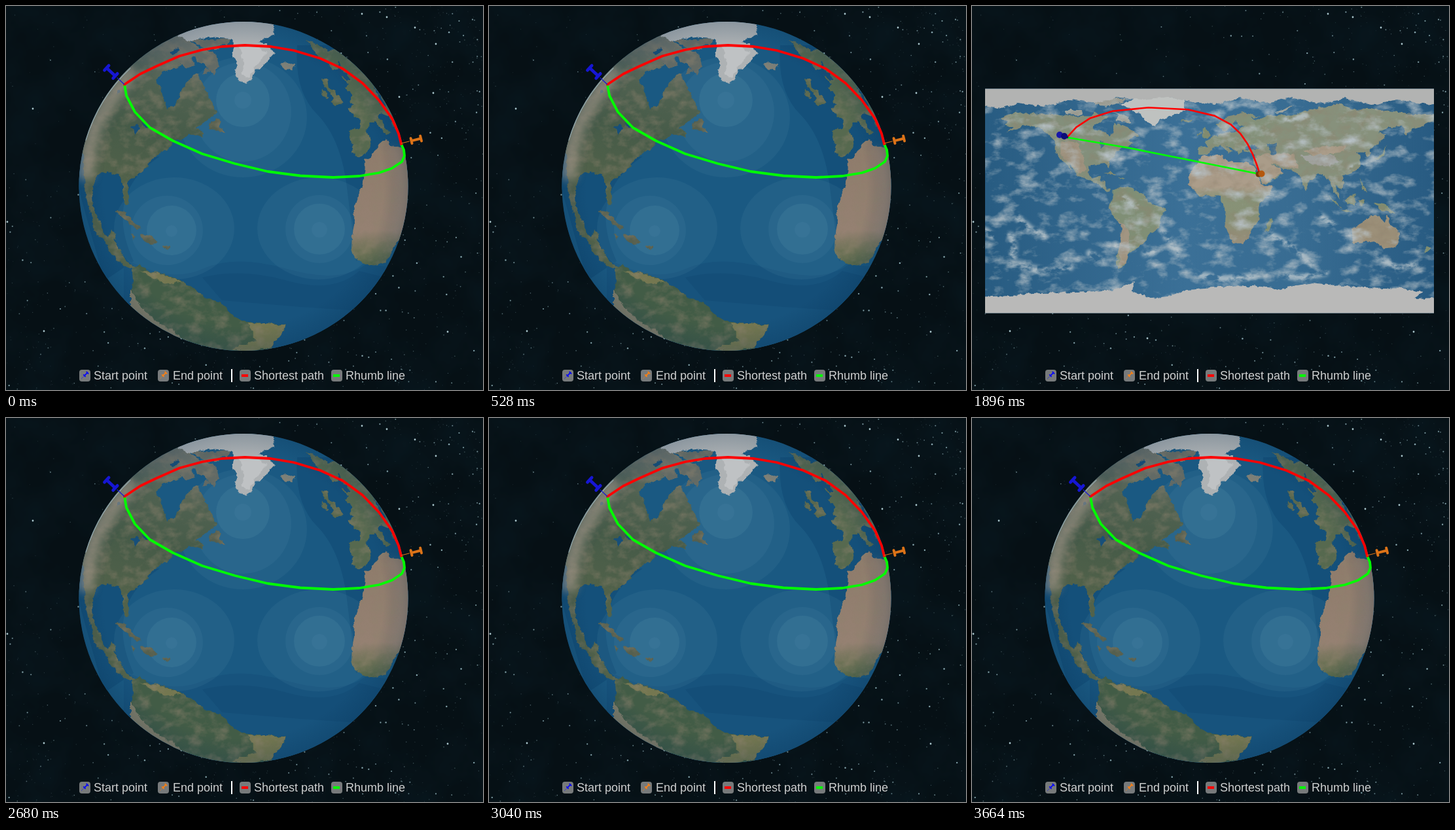
Animation of 729x587 px, one loop 4 s. Source, as an HTML page:

```html
<!DOCTYPE html>
<html lang="en">
<head>
<meta charset="utf-8">
<title>Shortest path and rhumb line</title>
<style>
html, body { margin: 0; height: 100%; overflow: hidden; background: #061015; }
svg { display: block; width: 729px; height: 587px; }
text { font: 18px "Liberation Sans", Arial, sans-serif; fill: #cfd0d0; }
.route { fill: none; stroke-linejoin: round; stroke-linecap: round; }
</style>
</head>
<body>
<svg viewBox="0 0 729 587">
<defs>
  <!-- ragged coasts -->
  <filter id="coast" filterUnits="userSpaceOnUse" x="0" y="0" width="729" height="587" color-interpolation-filters="sRGB">
    <feTurbulence type="fractalNoise" baseFrequency=".11" numOctaves="3" seed="4"/>
    <feColorMatrix values="1 0 0 0 0  0 1 0 0 0  0 0 1 0 0  0 0 0 0 1" result="n"/>
    <feDisplacementMap in="SourceGraphic" in2="n" scale="7" xChannelSelector="R" yChannelSelector="G"/>
  </filter>
  <!-- mottled ground -->
  <filter id="ground" filterUnits="userSpaceOnUse" x="0" y="0" width="729" height="587" color-interpolation-filters="sRGB">
    <feTurbulence type="fractalNoise" baseFrequency=".05 .07" numOctaves="4" seed="9"/>
    <feColorMatrix values="0 0 0 0 .56  0 0 0 0 .51  0 0 0 0 .43  1.2 0 0 0 -.5"/>
    <feComposite in2="SourceGraphic" operator="in" result="spots"/>
    <feMerge><feMergeNode in="SourceGraphic"/><feMergeNode in="spots"/></feMerge>
  </filter>
  <filter id="wisps" filterUnits="userSpaceOnUse" x="20" y="127" width="686" height="342" color-interpolation-filters="sRGB">
    <feTurbulence type="fractalNoise" baseFrequency=".03 .05" numOctaves="5" seed="12"/>
    <feColorMatrix values="0 0 0 0 .72  0 0 0 0 .76  0 0 0 0 .78  2.4 0 0 0 -1.2"/>
  </filter>
  <!-- broken cloud bands -->
  <filter id="streaks" filterUnits="userSpaceOnUse" x="0" y="100" width="729" height="387" color-interpolation-filters="sRGB">
    <feTurbulence type="fractalNoise" baseFrequency=".06 .09" numOctaves="5" seed="2"/>
    <feColorMatrix values="0 0 0 0 1  0 0 0 0 1  0 0 0 0 1  4 0 0 0 -1.5" result="gaps"/>
    <feGaussianBlur in="SourceGraphic" stdDeviation="2.5"/>
    <feComposite in2="gaps" operator="in"/>
  </filter>
  <filter id="haze" filterUnits="userSpaceOnUse" x="0" y="0" width="729" height="587" color-interpolation-filters="sRGB">
    <feTurbulence type="fractalNoise" baseFrequency=".012" numOctaves="4" seed="7"/>
    <feColorMatrix values="0 0 0 0 .04  0 0 0 0 .12  0 0 0 0 .16  .8 0 0 0 -.3"/>
  </filter>
  <filter id="soft" filterUnits="userSpaceOnUse" x="90" y="10" width="550" height="540"><feGaussianBlur stdDeviation="7"/></filter>
  <linearGradient id="north" gradientUnits="userSpaceOnUse" x1="200" y1="280" x2="260" y2="60">
    <stop stop-color="#52624a"/><stop offset=".4" stop-color="#465b48"/><stop offset=".7" stop-color="#4f6150"/><stop offset="1" stop-color="#69706a"/>
  </linearGradient>
  <linearGradient id="sahara" gradientUnits="userSpaceOnUse" x1="555" y1="210" x2="565" y2="400">
    <stop stop-color="#8e7b6b"/><stop offset=".7" stop-color="#958172"/><stop offset=".86" stop-color="#6d7256"/><stop offset="1" stop-color="#4e6346"/>
  </linearGradient>
  <linearGradient id="savanna" gradientUnits="userSpaceOnUse" x1="0" y1="37" x2="0" y2="-35">
    <stop stop-color="#aa9d8b"/><stop offset=".36" stop-color="#ac9d8a"/><stop offset=".48" stop-color="#879277"/><stop offset=".7" stop-color="#889176"/><stop offset="1" stop-color="#998f7b"/>
  </linearGradient>
  <linearGradient id="sea" x2="1">
    <stop stop-color="#285c82"/><stop offset=".45" stop-color="#3b7097"/><stop offset=".7" stop-color="#386c92"/><stop offset="1" stop-color="#285b82"/>
  </linearGradient>
  <radialGradient id="rim">
    <stop offset=".85" stop-color="#02294b" stop-opacity="0"/><stop offset="1" stop-color="#02294b" stop-opacity=".2"/>
  </radialGradient>
  <clipPath id="ball"><circle cx="363" cy="275.5" r="251.5"/></clipPath>
  <clipPath id="sheet"><path d="M20 126.500H706V469.500H20z"/></clipPath>
  <g id="pin">
    <path d="M0 0H13" stroke-width="1"/>
    <path d="M15 0H30" stroke-width="4"/>
    <path d="M16-4V4M31-4V4" stroke-width="4" stroke-linecap="round"/>
  </g>
  <rect id="tile" y="556" width="17" height="18" rx="4" fill="#777a7b"/>
</defs>

<rect width="729" height="587" fill="#061015"/>
<rect width="729" height="587" filter="url(#haze)"/>
<g id="stars" fill="none"></g>

<g id="globe">
  <g clip-path="url(#ball)">
    <path fill="#1a5982" d="M100 20H620V540H100z"/>
    <path fill="#14507a" d="M445 60Q440 130 475 165T520 270L535 390 630 350V60zM100 240L165 235 235 230Q190 260 181 300T195 390L150 420z"/>
    <path fill="#17537d" d="M180 385Q250 425 300 402T430 402 550 395L600 400V540H180z"/>
    <path fill="#144e78" d="M300 415Q360 400 430 420T540 405L600 420V470L450 460 330 450z"/>
    <g id="glow" fill="#6ea0bb"></g>
    <g filter="url(#ground)"><g filter="url(#coast)">
      <path fill="url(#north)" d="M118 215L119 250 122 290 129 318 134 342 141 349 153 363 161 377 171 390 185 399 197 403 204 397 193 399 181 386 173 372 166 360 168 347 160 343 156 352 148 348 145 330 133 308 132 290 135 267 141 256 155 254 172 258 178 265 178 281 181 302 186 305 188 290 186 273 190 265 205 256 217 247 220 236 235 225 249 218 256 206 270 203 282 195 300 201 301 192 290 188 306 176 322 164 317 152 310 138 302 120 291 104 279 113 265 134 259 151 246 157 241 142 236 123 229 111 240 101 264 92 276 83 302 70 288 58 255 35 150 40 90 180z"/>
      <path fill="#626a65" d="M286 68L305 64 321 74 326 93 317 106 306 91 292 85zM290 58L316 54 326 66 306 66zM264 84L279 76 289 90 274 96zM307 94L312 99 300 105zM282 52L342 50 338 60 300 62z"/>
      <path fill="#555f4e" d="M314 176L326 172 327 184 335 193 320 190 309 186zM166 312L180 315 196 330 206 338 200 341 185 330zM207 348L222 352 233 362 222 364 208 358zM239 367L250 369 246 373zM191 350L198 352 194 357z"/>
      <path fill="#425c46" d="M193 403L203 394 216 405 238 409 268 420 287 431 304 446 326 451 341 467 350 475 371 484 397 486 427 487 426 495 414 507 402 530 350 550 250 540 200 475 202 460 190 437 194 421z"/>
      <path fill="#747750" d="M370 485L397 486 427 488 425 496 406 520 370 530 345 524 382 512zM205 405L235 409 268 421 255 426 226 417z"/>
      <path fill="#85806a" d="M190 432L204 458 230 482 260 500 288 524 270 526 225 500 190 460z"/>
      <path fill="#56694f" d="M460 53L476 58 493 68 520 65 600 150 625 220 607 214 600 192 590 181 585 168 573 163 569 169 581 188 589 194 581 197 565 178 558 178 551 188 555 198 558 214 549 227 538 232 530 224 527 205 524 190 540 187 542 173 530 166 523 157 533 151 525 146 531 137 519 125 525 119 514 112 510 96 500 98 492 85 478 78z"/>
      <path fill="#59684e" d="M483 110L491 112 493 125 503 130 515 146 504 153 495 146 501 140 490 126zM483 126L490 131 491 140 482 138z"/>
      <path fill="#7a7f79" d="M418 89L425 85 434 87 442 90 438 97 427 98z"/>
      <path fill="url(#sahara)" d="M548 235L557 231 570 211 580 203 585 205 587 213 600 215 609 218 630 230 632 350 598 360 580 392 560 399 546 394 532 384 528 371 529 350 533 330 530 318 539 290 547 265z"/>
    </g></g>
    <g filter="url(#coast)">
      <path fill="#aeb2b4" d="M262 45L280 54 309 48 342 50 350 55 346 74 353 90 349 103 356 113 367 119 376 112 381 98 391 93 400 84 411 72 399 58 386 55 410 43 408 25 363 15 300 20z"/>
      <path fill="#bfc2c4" d="M356 62L383 60 399 72 384 88 372 110 360 104 364 86z"/>
      <path fill="#174f79" d="M192 186L200 180 205 187 198 197zM207 178L217 182 223 187 213 186zM169 134L172 128 177 132zM250 70L263 63 266 67 254 76zM508 83L514 98 526 110 520 113 508 103zM562 122L574 140 580 154 571 148z"/>
    </g>
    <path d="M121 265Q125 195 145 165T192 95" fill="none" stroke="#c4ad95" stroke-width="24" opacity=".62" filter="url(#soft)"/>
    <path d="M592 215Q620 280 593 355" fill="none" stroke="#c6af9e" stroke-width="8" opacity=".25" filter="url(#soft)"/>
    <circle cx="363" cy="275.5" r="251.500" fill="url(#rim)"/>
  </g>
  <path d="M122 205A251 251 0 0 1 190 95" class="route" stroke="#a9c7d5" stroke-width="1.200" opacity=".6"/>
  <g class="route" stroke-width="3.800">
    <path stroke="#0f0" d="M181 120L184 137 197 162 220 186 255 206 300 226 350 241 400 253 450 259.500 500 262 540 260 570 255 590 248 605 238 609 229 608 220 604 211"/>
    <path stroke="#f00" d="M181 120L205 104 230 92 265 76.500 300 67 330 62 365 60 405 62 440 68 480 80 515 96 545 118 570 144 590 172 600 195 604 211"/>
  </g>
  <use href="#pin" stroke="#1616d4" transform="translate(181 120) rotate(223) scale(1.200)"/>
  <use href="#pin" stroke="#dc7318" transform="translate(604 210) rotate(-14)"/>
</g>

<g id="map" clip-path="url(#sheet)">
  <path fill="url(#sea)" d="M20 126H706V470H20z"/>
  <g filter="url(#ground)"><g filter="url(#coast)">
    <!-- longitude and latitude in degrees -->
    <g transform="translate(363 298) scale(1.9056 -1.9056)">
      <path fill="#838f7b" d="M-168 66L-156 71-141 70-128 70-115 68-108 68-95 68-93 72-86 68-82 69-81 67-87 64-94 60-92 57-82 55-80 51-77 57-77 62-70 61-65 59-60 55-56 52-66 50-61 46-66 44-70 43-74 40-76 36-81 31-80 26-82 28-84 30-90 29-97 28-97 22-94 18-91 19-87 21-88 16-83 15-83 10-79 9-81 7-86 11-94 16-105 20-109 25-114 31-110 23-116 31-121 35-124 41-124 48-130 54-136 58-146 61-152 59-163 55-157 59-164 61-161 64z"/>
      <path fill="#a09480" d="M-120 47L-106 48-101 35-99 25-105 22-114 32-120 38z"/>
      <path fill="#808f76" d="M-78 8L-72 12-62 10-52 5-50 0-44-3-35-6-39-13-41-22-48-26-53-34-58-38-65-42-66-47-69-52-72-54-75-49-73-40-71-30-70-18-76-14-81-5-78 2z"/>
      <path fill="#a19582" d="M-76-13L-70-18-65-22-64-38-67-50-72-52-73-40-71-28-71-18z"/>
      <path fill="url(#savanna)" d="M-6 36L10 37 11 33 20 31 32 31 35 28 43 12 51 12 48 5 40-3 40-15 35-20 32-27 27-34 18-34 12-18 13-8 9 0 9 4-8 4-17 14-16 22z"/>
      <path fill="#84917a" d="M-9 43L-9 37-2 37 3 42 9 44 15 38 18 40 13 45 20 41 23 37 27 41 36 37 50 37 65 40 68 69 55 69 44 68 40 65 33 67 41 67 28 71 15 68 5 61 8 58 13 56 17 61 22 65 24 60 28 60 20 55 9 54 2 51-4 48-1 44z"/>
      <path fill="#87917c" d="M36 37L35 31 43 13 52 17 59 22 56 26 50 30 57 26 66 25 72 20 77 8 80 15 88 22 92 21 97 16 99 8 104 1 101 13 106 9 109 14 106 20 113 22 121 28 121 36 118 39 125 39 127 35 129 37 129 42 140 50 142 54 136 55 143 59 155 60 157 52 163 58 170 60 180 65 180 69 160 70 140 73 113 74 105 78 80 73 68 69 50 60z"/>
      <path fill="#aa9c89" d="M36 32L43 14 52 18 59 23 50 30 62 27 72 26 67 38 50 38 38 37zM75 40L90 44 110 44 105 39 85 36z"/>
      <path fill="#a0a29e" d="M73 36L80 30 95 28 103 31 100 37 85 37z"/>
      <path fill="#9c9079" d="M114-22L122-18 130-12 136-12 140-17 142-11 146-19 153-26 150-37 140-38 132-32 124-33 115-34z"/>
      <path fill="#7e8d70" d="M95 5L104-3 106-6 100-1zM109 1L117 6 116-4 110-3zM131-1L141-3 150-10 139-8zM105-7L115-8 109-9zM120 1L125 1 122-5 120-4zM121 18L126 8 123 9zM130 32L140 36 142 44 139 38zM44-25L49-13 50-16 47-25zM173-35L178-38 168-46 173-42zM-85 22L-75 20-79 23zM-73 19L-68 18-72 17zM-5 50L1 52-3 59-6 57zM-10 52L-6 54-8 55zM-24 65L-14 65-18 63z"/>
      <path fill="#a0a6a0" d="M-80 73L-65 67-63 63-76 65-72 69zM-117 73L-103 73-102 69-115 69zM-95 82L-65 82-80 76-92 77zM52 71L68 77 58 71z"/>
      <path fill="#3c6d92" d="M28 43L36 45 41 42 30 41zM47 46L54 46 53 37 49 38zM-88 48L-83 46-87 42z"/>
    </g>
  </g></g>
  <rect x="20" y="127" width="686" height="342" filter="url(#wisps)"/>
  <g class="route" stroke="#bcc7cc" stroke-width="11" opacity=".8" filter="url(#streaks)">
    <path d="M68 322L90 342 112 352M59 351Q68 370 60 388M60 395L115 406 150 399M290 342L303 360 317 380M456 350L487 366 520 395M340 410L385 417 430 414M473 411L505 415 540 407M531 320L555 337M230 293L251 307M580 248L610 241M480 173L510 168M20 343L31 352M621 383L650 402 680 395M265 378L280 374M180 378L198 390"/>
  </g>
  <g filter="url(#coast)">
    <path fill="#bfc2c0" d="M224 149L249 142 296 138 325 144 325 161 287 174 279 184 264 174 258 165z"/>
    <path fill="#b2b3b2" d="M0 110H729V146L700 151 650 143 615 151 570 142 530 149 490 139 450 148 410 141 370 150 337 147 300 139 260 143 225 140 190 148 150 143 110 154 70 149 40 157 0 149z"/>
    <path fill="#b9b9b8" d="M0 445L60 443 105 439 160 438 215 434 248 421 244 436 275 447 306 443 330 433 380 429 430 428 470 432 520 423 555 427 600 430 660 432 690 438 675 447 729 446V490H0z"/>
  </g>
  <g class="route" stroke-width="2.600">
    <path stroke="#0f0" d="M146 201L240 217 340 237 440 257"/>
    <path id="arc" stroke="#f00"/>
  </g>
  <path d="M139 199L147 201" stroke="#10106a" stroke-width="3"/>
  <circle cx="134" cy="197" r="5" fill="#1717a8"/><circle cx="141" cy="199" r="5" fill="#0c0c78"/>
  <circle cx="438" cy="257" r="4.500" fill="#763908"/><circle cx="442.500" cy="256.500" r="5" fill="#b4580f"/>
</g>

<g id="legend">
  <use href="#tile" x="112"/><use href="#tile" x="232"/><use href="#tile" x="357"/><use href="#tile" x="497"/>
  <use href="#pin" stroke="#00f" transform="translate(115 570) rotate(-45) scale(.43)"/>
  <use href="#pin" stroke="#ff8010" transform="translate(235 570) rotate(-45) scale(.43)"/>
  <path d="M360 565H370" stroke="#f00" stroke-width="4"/>
  <path d="M500 565H510" stroke="#0f0" stroke-width="4"/>
  <path d="M345 555V575" stroke="#fff" stroke-width="2"/>
  <text x="134" y="571">Start point</text><text x="255" y="571">End point</text>
  <text x="379" y="571">Shortest path</text><text x="519" y="571">Rhumb line</text>
</g>
</svg>
<script>
const $ = id => document.getElementById(id);
let seed = 71;
const rand = () => (seed = seed * 16807 % 2147483647) / 2147483647;

// Stars thicken towards the upper right and the bottom.
let sky = '';
for (let i = 0; i < 3000; i++) {
  const u = rand(), v = rand(), keep = rand(), light = rand() ** 4, size = .7 + light;
  const crowd = Math.max(u ** 3 * (1.15 - v), v * v * .5);
  if (keep > .12 + .9 * crowd) continue;
  const x = u * 729, y = v * 587;
  sky += `<circle cx="${x.toFixed(1)}" cy="${y.toFixed(1)}" r="${(size * .75).toFixed(2)}" fill="#9dc0c8" opacity="${(.18 + light * .7).toFixed(2)}"/>`;
}
for (const [x, y] of [[657, 58], [582, 17], [544, 12], [625, 33], [653, 133], [601, 139], [41, 157], [2, 330], [675, 498], [58, 497], [268, 508]])
  sky += `<circle cx="${x}" cy="${y}" r="1.4" fill="#a9c5cb"/>`;
$('stars').innerHTML = sky;

// Stepped reflections of three lamps on the water: x, y, rx, ry.
const rings = [
  [362, 144, 13, 13], [362, 144, 41, 41], [362, 162, 74, 76], [362, 170, 98, 92],
  [253, 344, 9, 9], [253, 343, 38, 38], [246, 343, 55, 53], [257, 340, 92, 78],
  [479, 342, 12, 12], [479, 341, 39, 39], [479, 341, 52, 52], [478, 340, 94, 78]
];
$('glow').innerHTML = rings.map(([x, y, rx, ry], i) =>
  `<ellipse cx="${x}" cy="${y}" rx="${rx}" ry="${ry}" opacity="${[.08, .13, .09, .09][i % 4]}"/>`).join('');

// Great circle between two map points, in twelve equal steps.
const rad = Math.PI / 180, zoom = 1.9056;
function toSphere(x, y) {
  const lon = (x - 363) / zoom * rad, lat = (298 - y) / zoom * rad;
  return [Math.cos(lat) * Math.cos(lon), Math.cos(lat) * Math.sin(lon), Math.sin(lat)];
}
function toMap([x, y, z]) {
  return [363 + Math.atan2(y, x) / rad * zoom, 298 - Math.asin(z) / rad * zoom];
}
const from = toSphere(146, 200), to = toSphere(440, 257);
const angle = Math.acos(from.reduce((sum, a, i) => sum + a * to[i], 0));
const arc = Array.from({ length: 13 }, (_, k) => {
  const a = Math.sin(angle * (1 - k / 12)), b = Math.sin(angle * k / 12);
  return toMap(from.map((p, i) => (p * a + to[i] * b) / Math.sin(angle)));
});
$('arc').setAttribute('d', 'M' + arc.join('L'));

function draw(now) {
  const t = now % 4000, flat = t >= 720 && t < 2680;
  $('globe').style.display = flat ? 'none' : '';
  $('map').style.display = flat ? '' : 'none';
  requestAnimationFrame(draw);
}
draw(performance.now());
</script>
</body>
</html>
```
